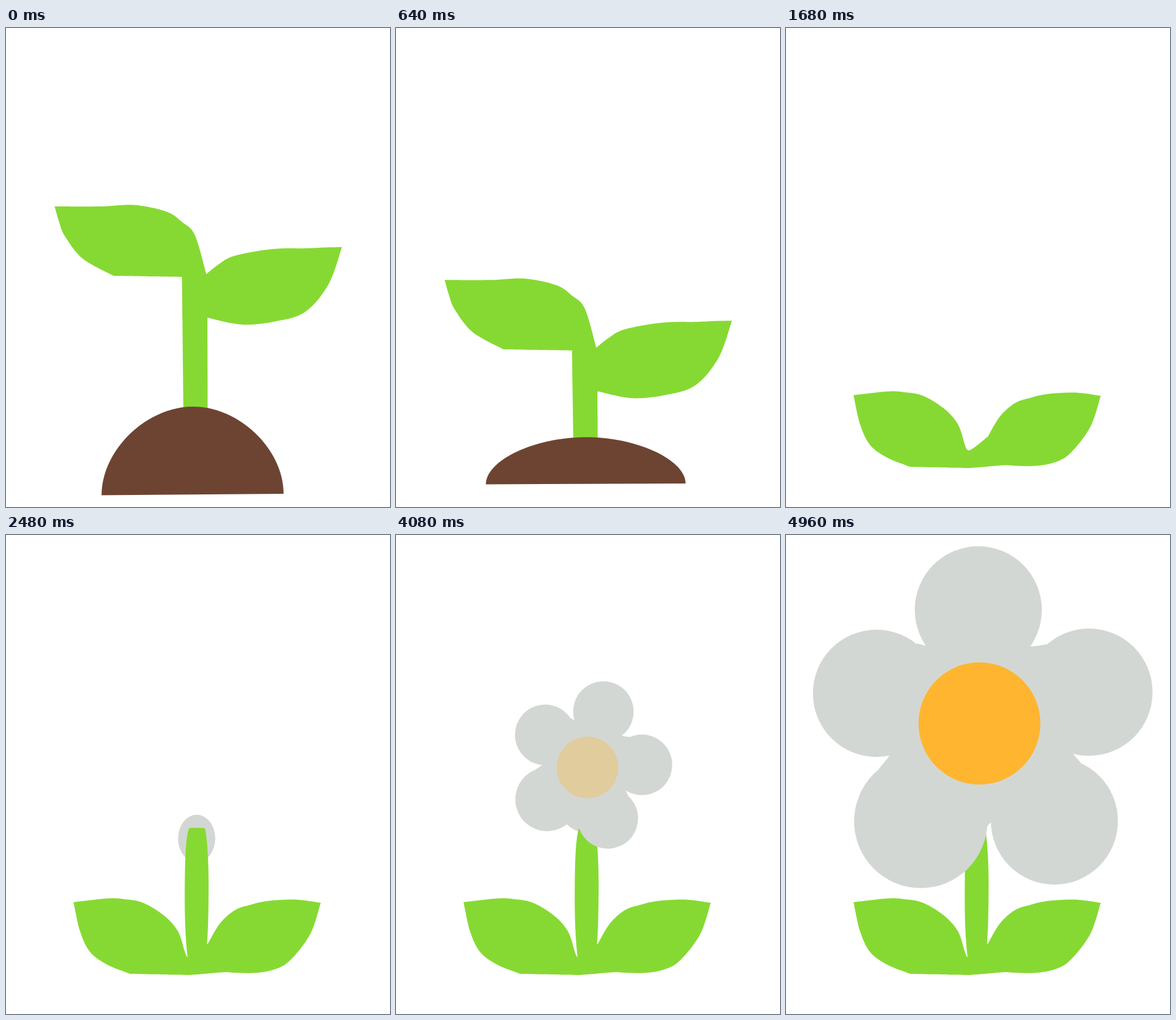
Write an HTML page that moves like this. It is 671 by 835 pixels and loops after 5.76 s.

```html
<!DOCTYPE html>
<html lang="en">
<head>
<meta charset="utf-8">
<title>Growing flower</title>
<style>
  html, body { margin: 0; width: 100%; height: 100%; overflow: hidden; background: #fff; }
  svg { display: block; width: 100vw; height: 100vh; }
  .green { fill: #86d932; }
  .grey { fill: #d3d7d3; }
  .soil { fill: #6d4432; }
</style>
</head>
<body>
<svg viewBox="0 0 671 835">
  <ellipse id="bud" class="grey"/>
  <path id="stem" class="green" d="M317 734C312 690 312 640 312.5 600Q313 535 319 513Q319.5 510.5 322 510.5H345Q347.5 510.5 348.5 514Q354 550 354 610Q354 680 351 716L345 745H322Z"/>
  <path id="leaves" class="green"/>
  <path id="mound" class="soil"/>
  <g id="bloom" class="grey">
    <circle cx="336" cy="130.500" r="111"/>
    <circle cx="529.500" cy="274" r="111"/>
    <circle cx="469" cy="498.500" r="111"/>
    <circle cx="235.500" cy="499" r="116.500"/>
    <circle cx="158" cy="276" r="111"/>
    <polygon points="229,189 244,193 434,194 458,190 503,383 515,397 358,501 351,508 162,408 180,386"/>
  </g>
  <circle id="core"/>
</svg>
<script>
const STEP = 80, LOOP = 5760, FPS = 24;
// Stages of growth, counted in 24ths of a second.
const SUNK = 30, PAIRED = 39, STEM = 40, STEM_UP = 58, BUD = 54, BUD_FULL = 76, BLOOM = 77, END = 119;

const $ = id => document.getElementById(id);
const lerp = (a, b, u) => a + (b - a) * u;
const mix = (a, b, u) => a.map((v, i) => lerp(v, b[i], u));
const share = (n, from, to) => Math.max(0, Math.min(1, (n - from) / (to - from)));

function set(id, attrs) {
  for (const key in attrs) $(id).setAttribute(key, attrs[key]);
}

const show = (id, on) => set(id, { visibility: on ? 'visible' : 'hidden' });

// Smooth runs of key points, joined at sharp corners marked by "/".
const runs = text => text.split('/').map(run =>
  run.trim().split(/\s+/).map(p => p.split(',').map(Number)));

const sprout = runs(`85,311 165,311 224,308.5 280,320 308,338.5 330,361 350,429
  / 350,429 350,429 / 373,411 400,397 464,385.5 527,384 557,382.5 587,382
  / 564,446 524,494 473,511 413,517 352,505
  / 352.5,664 / 310,664 / 307.5,434 / 188,432
  / 134,402 103,363 92.5,337 85,311`);
const pair = runs(`118,640 178,633.5 208,635 239,641 275,662.5 300,690 312,725
  / 321,736 353,712 / 374,677 400,654 426,645 457,638 505,635.5 550,641
  / 532,695 498,740 470,757 432,763.5 382,762
  / 322,767 / 318,767 / 290,766.5 / 217,765
  / 177,749 147,727 129.5,691 118,640`);

// Catmull-Rom curve through each run, starting from the last corner.
function outline(shape) {
  let corner = shape[0][0], d = 'M' + corner;
  shape.forEach((run, r) => {
    const p = r ? [corner, ...run] : run;
    const at = i => p[Math.max(0, Math.min(p.length - 1, i))];
    const slope = i => [0, 1].map(k => (at(i + 1)[k] - at(i - 1)[k]) / 6);
    for (let i = 0; i + 1 < p.length; i++) {
      const a = slope(i), b = slope(i + 1);
      d += `C${p[i].map((v, k) => v + a[k])} ${p[i + 1].map((v, k) => v - b[k])} ${p[i + 1]}`;
    }
    corner = at(p.length);
  });
  return d + 'Z';
}

// The leaves sink while the stem below them shortens.
function sink([x, y], n) {
  const below = Math.max(0, y - 517);
  return [x, y + 8.55 * n - below * n * 5 / 147];
}

function leavesPath(n) {
  const age = share(n, SUNK, PAIRED);
  return outline(sprout.map((run, r) => run.map((p, i) =>
    mix(sink(p, Math.min(n, SUNK)), pair[r][i], age))));
}

function moundPath(n) {
  const l = 167 - 0.667 * n, r = 485 + 1.4 * n, top = 660 + 3.55 * n;
  const yl = 814.5 - 1.27 * n, yr = 812 - 1.2 * n, x = (l + r) / 2 + 1, k = 0.51;
  return `M${l} ${yl}C${l} ${lerp(yl, top, k)} ${lerp(x, l, k)} ${top} ${x} ${top}
    C${lerp(x, r, k)} ${top} ${r} ${lerp(yr, top, k)} ${r} ${yr}Z`;
}

function drawBud(n) {
  const full = [332, 465, 54.5, 70.5];
  const [cx, cy, rx, ry] = n < BLOOM
    ? mix([333.5, 548, 26, 33], full, share(n, BUD, BUD_FULL))
    : mix(full, [338, 390, 75, 113], share(n, BLOOM, END));
  set('bud', { cx, cy, rx, ry });
}

// The flower opens evenly while its spin slows to a stop.
function drawBloom(n) {
  const u = share(n, BLOOM, END);
  const turn = 0.175 * Math.max(0, 107 - n) ** 2;
  const [x, y] = mix([330, 463], [345.6, 335.4], u);
  set('bloom', {
    transform: `translate(${x} ${y}) rotate(${turn}) scale(${u}) translate(-345.6 -335.4)`
  });
  const [cx, cy, r] = mix([331.5, 475, 6], [338, 328.5, 106.5], u);
  const rgb = mix([211, 215, 211], [255, 181, 47], u ** 1.5).map(Math.round);
  set('core', { cx, cy, r, fill: `rgb(${rgb})` });
}

function draw(n) {
  const grow = share(n, STEM, STEM_UP);
  set('leaves', { d: leavesPath(n) });
  set('mound', { d: moundPath(n) });
  set('stem', { transform: `translate(0 ${740 * (1 - grow)}) scale(1 ${grow})` });
  drawBud(n);
  drawBloom(n);
  show('mound', n <= SUNK + 1);
  show('stem', n > STEM);
  show('bud', n >= BUD);
  show('bloom', n > BLOOM);
  show('core', n > BLOOM + 1);
}

let shown = -1;
function tick() {
  const ms = Math.floor(performance.now() % LOOP / STEP) * STEP;
  const n = Math.min(END, Math.floor(ms * FPS / 1000 + 1e-6));
  if (n !== shown) draw(shown = n);
  requestAnimationFrame(tick);
}
tick();
</script>
</body>
</html>
```
